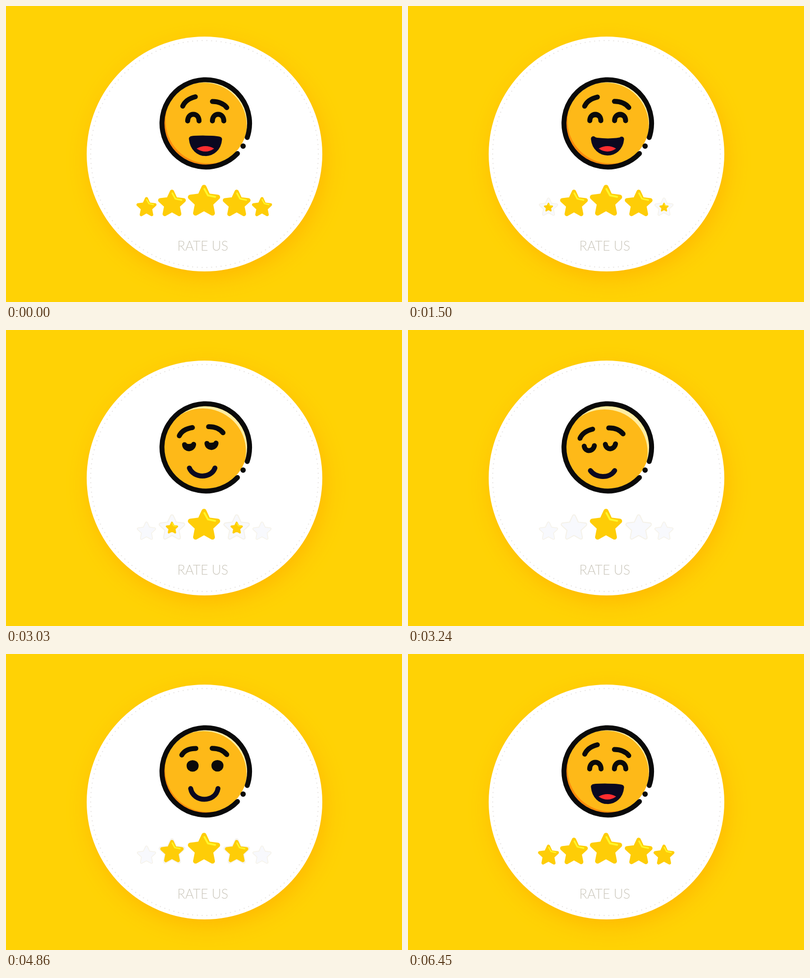
Recreate the animation shown at these times as an HTML page. Size 800 by 600 pixels, loop 6480 ms.

```html
<!DOCTYPE html>
<html lang="en">
<head>
<meta charset="utf-8">
<title>Rate us</title>
<style>
  html, body { margin: 0; width: 100%; height: 100%; overflow: hidden; background: #ffd205; }
  svg { display: block; width: 100vw; height: 100vh; }
  .line { fill: none; stroke: #0a0a0a; stroke-width: 10; stroke-linecap: round; stroke-linejoin: round; }
  .solid { fill: #0a0a0a; }
  #mouth { fill: #0a0820; stroke: #0a0820; }
  text { font: 300 26.5px Lato, "Open Sans", sans-serif; fill: #cbc7bc; text-anchor: middle; }
</style>
</head>
<body>
<svg viewBox="0 0 800 600" xmlns="http://www.w3.org/2000/svg">
  <defs>
    <filter id="blur" x="-30%" y="-30%" width="160%" height="160%">
      <feGaussianBlur stdDeviation="25"/>
    </filter>
    <clipPath id="disc"><circle cx="403.5" cy="238" r="84"/></clipPath>
  </defs>
  <rect width="800" height="600" fill="#ffd205"/>
  <circle cx="407" cy="314" r="232" fill="#ffae00" opacity=".85" filter="url(#blur)"/>
  <circle cx="401" cy="300" r="238" fill="#fff"/>
  <circle cx="401" cy="300" r="230" fill="none" stroke="#ebe8e6" stroke-width="2.6"
    stroke-linecap="round" pathLength="1500" stroke-dasharray="0 10"/>

  <g clip-path="url(#disc)">
    <circle cx="403.5" cy="238" r="84" fill="#feb918"/>
    <circle id="shade" cx="403.5" cy="238" r="107" fill="none" stroke="#ff8c0c" stroke-width="40"/>
    <circle id="light" cx="403.5" cy="238" r="107" fill="none" stroke="#ffeda2" stroke-width="40"/>
  </g>
  <path class="line" d="M467.6 299 A88.5 88.5 0 1 1 487.3 266.6"/>
  <circle class="solid" cx="479" cy="284" r="5.4"/>
  <path id="browL" class="line"/>
  <path id="browR" class="line"/>
  <path id="eyeL" class="line solid"/>
  <path id="eyeR" class="line solid"/>
  <path id="mouth" class="line"/>
  <path id="tongue" fill="#ff2d2f" d="M-18 0Q0-10 17.5 0Q0 12 -18 0Z"/>

  <g id="stars"></g>
  <text x="397.5" y="496">RATE US</text>
</svg>
<script>
const LOOP = 6480, STEP = 30;
const $ = id => document.getElementById(id);
const mix = (a, b, p) => a + (b - a) * p;
const ease = p => p < .5 ? 2 * p * p : 1 - 2 * (1 - p) ** 2;

// Eased value at time t from [time, value] pairs
function keys(t, list) {
  if (t <= list[0][0]) return list[0][1];
  for (let i = 1; i < list.length; i++) {
    const [t0, a] = list[i - 1], [t1, b] = list[i];
    if (t < t1) return mix(a, b, ease((t - t0) / (t1 - t0)));
  }
  return list[list.length - 1][1];
}

// Moods: 0 laughing, 1 smiling, 2 content
function pose(list, mood) {
  const i = Math.min(1, Math.floor(mood));
  return list[i].map((v, k) => mix(v, list[i + 1][k], mood - i));
}

// Brows: start, control, end
const BROW_L = [
  [357, 203, 363, 189, 382.5, 184],
  [355.5, 204, 363, 191, 384, 191],
  [347.5, 219.5, 353, 206, 373, 201]
];
const BROW_R = [
  [417, 193.5, 437, 194, 446, 206],
  [417, 191, 436, 191, 446.5, 203.5],
  [405.5, 198.5, 424, 198, 434.5, 210.5]
];

// Eyes and mouth: left end, right end, two lower controls, two upper controls
const eyeArch = x => [x, 233, x + 23, 233, x, 215, x + 23, 215, x + 23, 215, x, 215];
const eyeDot = (x, y) => [x - 7, y, x + 7, y, x - 7, y + 9.3, x + 7, y + 9.3, x + 7, y - 9.3, x - 7, y - 9.3];
const eyeCup = (x, y) => [x, y, x + 20.5, y - 1, x + 2, y + 12.5, x + 18, y + 11.5, x + 18, y + 11.5, x + 2, y + 12.5];
const EYE_L = [eyeArch(367), eyeDot(377.5, 226), eyeCup(356, 235.5)];
const EYE_R = [eyeArch(417), eyeDot(428, 226), eyeCup(398.7, 231.8)];
const MOUTH = [
  [374.5, 269, 431.5, 270, 378, 309, 428, 309, 428, 267, 378, 267],
  [374.5, 269, 431.5, 269, 378, 302, 428, 302, 428, 302, 378, 302],
  [368.5, 285, 417.5, 285, 380, 301, 408, 301, 408, 301, 380, 301]
];

const moodKeys = (a, b, c, d, e, f, g, h) =>
  [[a, 0], [b, 1], [c, 1], [d, 2], [e, 2], [f, 1], [g, 1], [h, 0]];
const EYE_TIME = moodKeys(1440, 1740, 2750, 3220, 4630, 4900, 6120, 6440);
const MOUTH_TIME = moodKeys(1380, 1740, 2750, 3220, 4630, 4980, 6140, 6440);
const SHADE_TIME = moodKeys(1440, 1740, 2750, 3220, 4630, 4960, 6140, 6440);
const SMALL_TIME = [[1160, 1], [1270, 1.12], [1690, 0], [6150, 0], [6420, 1.08], [6480, 1]];
const MID_TIME = [[2760, 1], [2850, 1.08], [3180, 0], [4660, 0], [4960, 1.08], [5100, 1]];

const brow = ([a, b, c, d, e, f]) => `M${a} ${b}Q${c} ${d} ${e} ${f}`;
const loop = ([lx, ly, rx, ry, a, b, c, d, e, f, g, h]) =>
  `M${lx} ${ly}C${a} ${b} ${c} ${d} ${rx} ${ry}C${e} ${f} ${g} ${h} ${lx} ${ly}Z`;

const starPath = "M" + Array.from({ length: 10 }, (_, i) => {
  const r = i % 2 ? 14 : 29, a = i * Math.PI / 5;
  return (r * Math.sin(a)).toFixed(2) + " " + (-r * Math.cos(a)).toFixed(2);
}).join("L") + "Z";

const starShape = (fill, width) =>
  `<path d="${starPath}" fill="${fill}" stroke="${fill}" stroke-width="${width}" stroke-linejoin="round"/>`;

const STARS = [
  [283.8, 408.4, .62, SMALL_TIME],
  [335.3, 401.5, .86, MID_TIME],
  [400, 396.4, 1, [[0, 1]]],
  [466, 401.5, .86, MID_TIME],
  [517.2, 408.4, .62, SMALL_TIME]
];

$("stars").innerHTML = STARS.map(([x, y, s]) =>
  `<g transform="translate(${x} ${y}) scale(${s})">
    <g transform="scale(.95)">${starShape("#f5f2e9", 10)}${starShape("#f8f9fd", 5)}</g>
    <g class="gold">${starShape("#fecd07", 10)}
      <path d="M.8-25.5L8-12.5L22.5-9.5" fill="none" stroke="#fff72a" stroke-width="3.8"
        stroke-linecap="round" stroke-linejoin="round"/></g>
  </g>`).join("");
const golds = document.querySelectorAll(".gold");

function draw(t) {
  const eyes = keys(t, EYE_TIME), lips = keys(t, MOUTH_TIME);
  $("browL").setAttribute("d", brow(pose(BROW_L, eyes)));
  $("browR").setAttribute("d", brow(pose(BROW_R, eyes)));
  $("eyeL").setAttribute("d", loop(pose(EYE_L, eyes)));
  $("eyeR").setAttribute("d", loop(pose(EYE_R, eyes)));
  $("mouth").setAttribute("d", loop(pose(MOUTH, lips)));

  const open = Math.max(0, Math.min(1, (1 - lips) * 1.4 - .1));
  $("tongue").setAttribute("transform", `translate(403 289) scale(${open})`);

  const calm = Math.max(0, keys(t, SHADE_TIME) - 1);
  const dark = mix(5.7, 0, calm);
  $("shade").setAttribute("transform", `translate(${dark} ${-dark})`);
  $("light").setAttribute("transform", `translate(${mix(-4.2, -6.5, calm)} ${mix(4.2, 10, calm)})`);

  STARS.forEach((star, i) =>
    golds[i].setAttribute("transform", `scale(${keys(t, star[3])})`));
}

function tick(now) {
  draw(Math.floor(now % LOOP / STEP) * STEP);
  requestAnimationFrame(tick);
}
draw(0);
requestAnimationFrame(tick);
</script>
</body>
</html>
```
